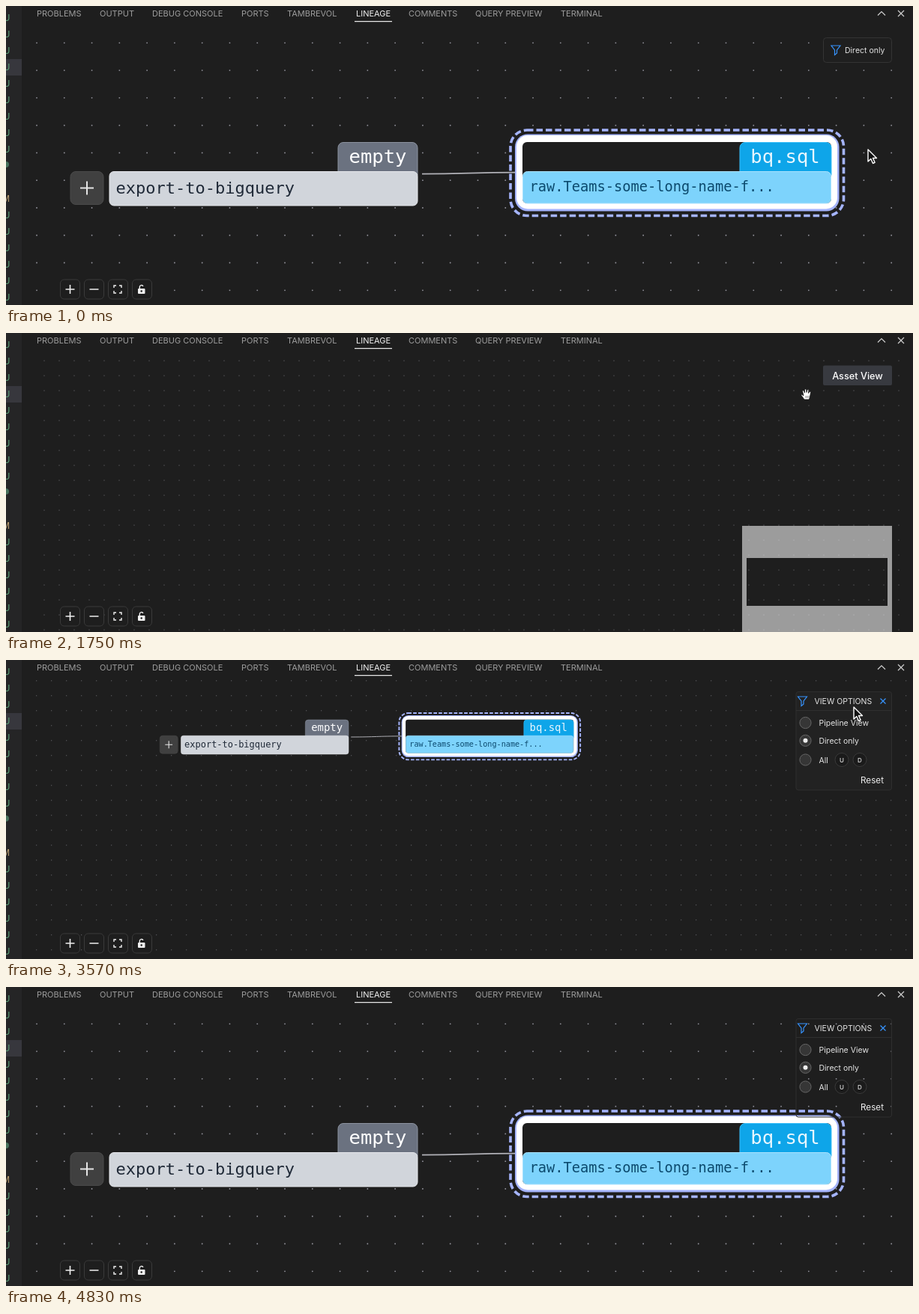
Write an HTML page with a canvas that moves like this. It is 1210 px wide and 400 px high and loops after 5460 ms.

```html
<!DOCTYPE html>
<html lang="en">
<head>
<meta charset="utf-8">
<title>Lineage panel</title>
<style>
html, body { margin: 0; width: 100%; height: 100%; overflow: hidden; background: #1e1e1e; }
canvas { display: block; }
</style>
</head>
<body>
<canvas id="stage" width="1210" height="400"></canvas>
<script>
const ctx = document.getElementById('stage').getContext('2d');
const SANS = 'Inter, sans-serif', MONO = '"DejaVu Sans Mono", monospace';
const BG = '#1e1e1e', LOOP = 5460, STEP = 70;

function text(s, x, y, size, color, font = SANS, align = 'left', weight = 400) {
  ctx.font = `${weight} ${size}px ${font}`;
  ctx.textAlign = align;
  ctx.fillStyle = color;
  ctx.fillText(s, x, y);
}
function rect(x, y, w, h, r, fill, stroke, width = 1) {
  ctx.beginPath();
  ctx.roundRect(x, y, w, h, r);
  if (fill) { ctx.fillStyle = fill; ctx.fill(); }
  if (stroke) { ctx.strokeStyle = stroke; ctx.lineWidth = width; ctx.stroke(); }
}
function path(d, stroke, width = 1, fill) {
  const p = new Path2D(d);
  if (fill) { ctx.fillStyle = fill; ctx.fill(p); }
  if (stroke) { ctx.strokeStyle = stroke; ctx.lineWidth = width; ctx.stroke(p); }
}
function circle(x, y, r, fill, stroke) {
  rect(x - r, y - r, 2 * r, 2 * r, r, fill, stroke);
}
function dots(x0, y0, gap, r) {
  ctx.fillStyle = '#91919a';
  for (let x = x0; x < 1205; x += gap)
    for (let y = y0; y < 400; y += gap) {
      if (x < 35 || y < 25) continue;
      ctx.beginPath();
      ctx.arc(x, y, r, 0, 7);
      ctx.fill();
    }
}

// Editor frame
const TABS = [['PROBLEMS', 41], ['OUTPUT', 125], ['DEBUG CONSOLE', 195], ['PORTS', 314],
  ['TAMBREVOL', 375], ['LINEAGE', 467], ['COMMENTS', 537], ['QUERY PREVIEW', 626], ['TERMINAL', 740]];

function chrome() {
  rect(0, 0, 21, 400, 0, '#252526');
  rect(0, 71, 21, 22, 0, '#37373d');
  for (let i = 0; i < 18; i++) {
    const y = 16 + 22 * i;
    if (i === 9) circle(0, y - 2, 4, '#47705c');
    else if (i === 11) text('M', 5, y + 4, 12, '#b89c70', SANS, 'right');
    else if (i !== 10) text('U', 5.5, y + 4, 12, '#5fa57b', SANS, 'right');
  }
  for (const [name, x] of TABS) text(name, x, 14, 11, name === 'LINEAGE' ? '#f0f0f0' : '#9d9d9d');
  rect(465, 20, 50, 1.2, 0, '#e7e7e7');
  path('M1163 12.5l5-5 5 5M1190 6l8 8M1198 6l-8 8', '#cccccc', 1.2);
}
function controls() {
  for (const x of [72.5, 104.5, 136.5, 168.5]) rect(x, 366, 26, 26, 5, BG, '#3a3a3a');
  path('M79.5 379h12M85.5 373v12M111.5 379h12', '#f0f0f0', 1.6);
  path('M144 377v-3h3M151 374h3v3M154 381v3h-3M147 384h-3v-3', '#f0f0f0', 1.4);
  path('M178.3 379v-3a2.4 2.4 0 0 1 4.6 -1', '#f0f0f0', 1.4);
  rect(176, 378, 9.5, 7, 1, '#f0f0f0');
  circle(180.7, 381.5, 1.2, BG);
}

// Two-node view, laid out at full zoom
function pairView(k, withNodes) {
  const s = (1 + 0.839 * k) / 1.839, tx = 233.5 - 95.5 * k, ty = 101 + 120 * k, gap = 36.78 * s;
  const first = v => v - Math.floor(v / gap) * gap;
  dots(first(tx - 97 * s), first(ty - 171.7 * s), gap, 0.92 * s);
  if (!withNodes) return;
  ctx.save();
  ctx.translate(tx, ty);
  ctx.scale(s, s);
  ctx.translate(-138, -221);
  path('M555 224.7C615 224.7 620 222.6 682 222.6', '#b1b1b7', 1.8);
  rect(86, 221.5, 44, 44, 7, '#404040', '#4a4a4a');
  path('M99 243.5h18M108 234.5v18', '#e5e5e5', 2);
  rect(443, 182.5, 106, 44, [7, 7, 0, 0], '#6b7280', '#8b929e');
  text('empty', 496, 210, 25.6, '#ffffff', MONO, 'center');
  rect(138, 221.5, 411, 45.5, 6, '#d1d5db', '#e5e7eb');
  text('export-to-bigquery', 146.5, 250.5, 22, '#1f2937', MONO);

  ctx.setLineDash([8.5, 4]);
  rect(673, 166, 444.5, 114.5, 22, null, '#a5b4fc', 3.6);
  ctx.setLineDash([]);
  rect(679, 171.5, 432.5, 103, 17, '#a5b4fc');
  rect(681, 173, 428, 98.5, 15, '#ffffff');
  rect(689, 182, 412, 82, 6, BG);
  rect(979, 182.5, 122, 44, [7, 7, 0, 0], '#0ea5e9', '#38bdf8');
  text('bq.sql', 1039.5, 210, 25.6, '#e8f6fe', MONO, 'center');
  rect(689.5, 221.5, 411, 42.5, 6, '#7dd3fc', '#a9e1fd');
  text('raw.Teams-some-long-name-f...', 698.5, 248, 18.7, '#0c4a6e', MONO);
  ctx.restore();
}

function funnel(x, y) {
  path(`M${x} ${y}h12l-4.5 6v4l-3 2.5v-6.5z`, '#3794ff', 1.2);
}
function directButton() {
  rect(1090.5, 42.5, 91, 33, 4, '#1f1f1f', '#343434');
  funnel(1101, 53);
  text('Direct only', 1119, 62.5, 10.5, '#e4e4e4');
}
function optionsPanel(solid) {
  rect(1054, 42.5, 127.5, 131.5, 3, solid ? '#222222' : null, '#2e2e2e');
  path('M1054 67.5h127', '#303030');
  funnel(1056.5, 49);
  text('VIEW OPTIONS', 1078.5, 58.7, 10.5, '#e4e4e4');
  path('M1166.5 51.5l7 7M1173.5 51.5l-7 7', '#3794ff', 1.2);
  [['Pipeline View', 84], ['Direct only', 107.8], ['All', 133.5]].forEach(([label, y], i) => {
    circle(1066.5, y, 7.6, '#363636', '#666666');
    if (i === 1) circle(1066.5, y, 3, '#ededed');
    text(label, 1084.5, y + 4.3, 10.5, '#e4e4e4');
  });
  for (const [c, x] of [['U', 1115], ['D', 1139]]) {
    circle(x, 133.5, 9, '#1b1b1b', '#3a3a3a');
    text(c, x, 136.5, 8, '#e4e4e4', SANS, 'center', 500);
  }
  text('Reset', 1140, 165, 11.7, '#eeeeee');
}

// Pipeline graph: column key -> x, row centres, labels
const COLS = {
  s: [185, [53], 'dashboard.booking_status'],
  p: [248, [202], 'dashboard.pipeline_run'],
  h: [332, [202], 'export-to-bigquery'],
  a: [450, [53, 94, 115, 135, 156, 177, 198, 218, 239, 260, 280, 307, 339, 360, 380, 401],
    'raw.KidReportResponses raw.AiConversations raw.CreditRules raw.Bookings raw.Languages raw.Sessions raw.Countries raw.States raw.TeamMemberships raw.Teams-some-long-name-f... raw.Users raw.Organisations raw.Programmes-vw_Program... raw.ProgrammeSessionAction... events_events events_sessions'],
  b: [558, [190, 211, 243, 315], 'dashboard.person_cpd_exp... dashboard.organisations dashboard.users dashboard.organisation...'],
  c: [667, [66, 87, 108, 184, 277, 297, 318],
    'raw.AssetReactSessions raw.KidResults raw.Kids dashboard.bookings dashboard.page_views raw.ProgrammeSessionAttac... raw.BookingAttendances'],
  d: [827, [86, 106, 165, 185, 206, 227, 248],
    'dashboard.performance_repo... dashboard.performance_repo... dashboard.count_report dashboard.ai_conversations dashboard.resources dashboard.programme_report dashboard.all_credit_report'],
  e: [911, [56, 222, 262], 'dashboard.ai_reports hellenic_psuches dashboard.user_bookings'],
  f: [995, [262], 'dashboard.user_report']
};
const nodes = {};
for (const [key, [x, ys, labels]] of Object.entries(COLS))
  ys.forEach((y, i) => nodes[key + i] = { x, y, top: y - 8.7, label: labels.split(' ')[i] });

// Each group: source, then its targets
const EDGES = ('p0 h0;h0 a0 a1 a2 a3 a4 a5 a6 a7 a8 a9 a10 a11 a12 a13 a14 a15 c0 c1 c2 c5 c6;' +
  'a0 e0;a1 d3;a2 d2;a3 c3;a4 c3;a5 b0 c3;a6 b1;a8 b2;a10 b2;a11 b1 b2 b3 c4;a12 b3;a14 c4;a15 d5;' +
  'b0 c3;b1 c3 d4 d5 d6;b2 c3 c4 d2 d3 d4 d5;b3 c4;c0 d0 d1;c1 d0 d1;c2 d0 d1;' +
  'c3 d0 d1 d2 d3 d4 d5 d6;c5 d4 d5;c6 d3 d5 d6 e2;d3 e0;d5 e1 e2;e2 f0')
  .split(';').flatMap(g => { const [from, ...to] = g.split(' '); return to.map(n => [nodes[from], nodes[n]]); });

function graph() {
  for (const [a, b] of EDGES) {
    const x1 = a.x + 59, x2 = b.x - 1, y1 = a.top + 6, y2 = b.top + 6, m = (x1 + x2) / 2;
    path(`M${x1} ${y1}C${m} ${y1} ${m} ${y2} ${x2} ${y2}`, 'rgba(177,177,183,.62)', 0.8);
  }
  for (const n of Object.values(nodes)) {
    const { x, top, label } = n;
    const [row, badge, tag] = n === nodes.h0 ? ['#d1d5db', '#6b7280', 'empty']
      : n === nodes.e1 ? ['#86efac', '#22c55e', 'python'] : ['#7dd3fc', '#0ea5e9', 'bq.sql'];
    if (n === nodes.a9) rect(x - 1, top - 0.5, 60, 13, 2, BG, '#ffffff', 1.5);
    rect(x + 41, top, 17, 6, [1, 1, 0, 0], badge);
    text(tag, x + 49.5, top + 4, 3.6, '#ffffff', MONO, 'center', 700);
    rect(x, top + 5.5, 58, 6.5, 0.8, row);
    text(label, x + 1.2, top + 9.8, 3.1, '#0c4a6e', MONO);
  }
}
function minimap(withNodes) {
  const scale = 0.1605;
  ctx.fillStyle = 'rgba(240,240,240,.6)';
  ctx.beginPath();
  ctx.rect(982, 258, 200, 142);
  ctx.rect(988, 301, 188, 64);
  ctx.fill('evenodd');
  if (!withNodes) return;
  for (const { x, top } of Object.values(nodes))
    rect(988 + (x - 37) * scale, 301 + (top - 25) * scale, 58 * scale, 12 * scale, 0, '#f0f0f0');
}
function assetView(loaded) {
  if (loaded) graph(); else dots(51, 37, 20, 0.5);
  minimap(loaded);
  rect(1090, 43.5, 92, 26.5, 2, '#383a40');
  text('Asset View', 1136, 61.5, 12.7, '#ffffff', SANS, 'center', 500);
}

// Cursor: time, x, y
const MOVES = [[0, 1150, 192], [420, 1139, 60], [840, 1139, 60], [1120, 1078, 112], [1190, 1073, 113],
  [1260, 1073, 112], [1400, 1069, 84], [1470, 1070, 84], [1610, 1070, 84], [1680, 1068, 82],
  [2520, 1068, 82], [2590, 1070, 89], [2940, 1131, 63], [4550, 1131, 63], [4760, 872, 292]];
const SHAPES = {
  arrow: 'M0 0v16l3.8-3.5 2.7 6 2.6-1.2-2.6-5.8h5z',
  pointer: 'M-1.5 1.5q1.5-2.5 3 0v5q1.5-1.2 2.6.2 1.6-.9 2.6.5 2-.5 2.3 1.3v3.5l-1.8 3.5h-7l-4.6-6q0-2 2.9-.3z',
  grab: 'M-3 7l-4-5.5q.5-2.2 3 .3l-1.5-6q1-1.8 2.2 0l.8 2.2v-4.2q1.2-1.5 2.2 0l.3 3.7.8-3.5q1.4-1 2 .5l-.2 4 1.4-2.2q1.7-.4 1.6 1.2l-1.2 6.5-1 3z'
};
function cursor(t) {
  if (t >= 4830) return;
  let i = MOVES.findIndex(m => m[0] > t);
  if (i < 0) i = MOVES.length - 1;
  const [t0, x0, y0] = MOVES[i - 1], [t1, x1, y1] = MOVES[i];
  const u = Math.min(1, (t - t0) / (t1 - t0));
  const kind = t < 420 || t >= 2870 ? 'arrow' : t < 1680 ? 'pointer' : 'grab';
  ctx.save();
  ctx.translate(x0 + (x1 - x0) * u, y0 + (y1 - y0) * u);
  ctx.lineJoin = 'round';
  if (kind === 'arrow') path(SHAPES.arrow, '#ffffff', 1.4, '#111111');
  else path(SHAPES[kind], '#111111', 0.8, '#ffffff');
  if (kind === 'pointer') path('M2 9.5v3.5M4.2 9.5v3.5M6.4 9.5v3.5', '#333333', 0.7);
  if (kind === 'grab') path('M-1 2v3M1 2v3M3 2v3', '#555555', 0.7);
  ctx.restore();
}

const easeInOut = u => u < 0.5 ? 4 * u ** 3 : 1 - 4 * (1 - u) ** 3;

function draw(now) {
  const time = now % LOOP, t = time - time % STEP;
  rect(0, 0, 1210, 400, 0, BG);
  if (t >= 1680 && t < 3430) {
    assetView(t >= 1960);
  } else {
    const u = t < 1680 ? 1 : Math.min(1, Math.max(0, (t - 3710) / 350));
    pairView(easeInOut(u), t < 1680 || t >= 3570);
    if (t < 560) directButton(); else optionsPanel(t < 4690);
  }
  chrome();
  controls();
  cursor(t);
}
const start = performance.now();
(function frame() {
  draw(performance.now() - start);
  requestAnimationFrame(frame);
})();
</script>
</body>
</html>
```
